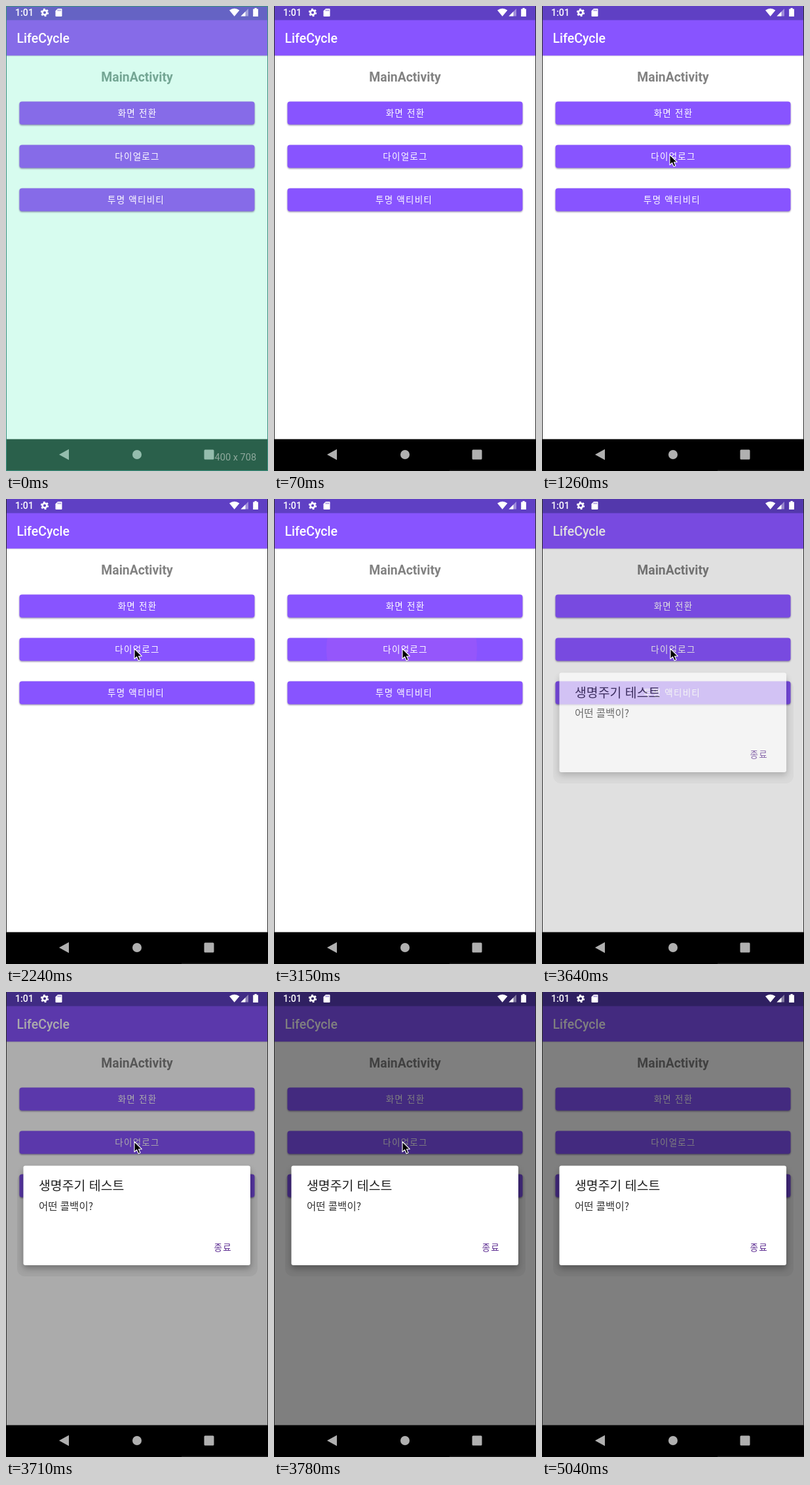
Animation of 400 by 708 pixels, one loop 5.6 s. Source, as an HTML page:

```html
<!DOCTYPE html>
<html lang="ko">
<head>
<meta charset="utf-8">
<title>LifeCycle</title>
<style>
  html, body { margin: 0; width: 100%; height: 100%; overflow: hidden; background: #000; }
  svg {
    display: block; width: 100%; height: 100%;
    --page: #fff; --bar: #8854ff; --status: #5f40c4; --nav: #000;
    --icon: #b0b0b0; --head: #828282; --edge: #2b2b2b;
    font-family: Roboto, "Noto Sans CJK KR", "Noto Sans CJK", sans-serif;
  }
  svg.select {
    --page: #d7fcef; --bar: #866be8; --status: #6563c4; --nav: #2a604b;
    --icon: #94bdad; --head: #74a694; --edge: #3a8f7f;
  }
  .select-only { display: none; }
  .select .select-only { display: inline; }
  .select .record-only { display: none; }
  .kr { font-family: "Noto Sans CJK KR", "Noto Sans CJK", sans-serif; }
  .btn { font-size: 13.55px; letter-spacing: 1.21px; }
</style>
</head>
<body>
<svg id="stage" viewBox="0 0 400 708" preserveAspectRatio="none">
  <defs>
    <filter id="soft" x="-10%" y="-30%" width="120%" height="160%"><feGaussianBlur stdDeviation="1.1"/></filter>
    <filter id="wide" x="-10%" y="-20%" width="120%" height="140%"><feGaussianBlur stdDeviation="5"/></filter>
    <clipPath id="pressed"><rect x="20.5" y="211.5" width="359" height="35" rx="4"/></clipPath>
  </defs>

  <rect width="400" height="708" fill="var(--page)"/>
  <rect y="75" width="400" height="1.5" fill="#000" opacity=".12"/>
  <rect y="21" width="400" height="54.5" fill="var(--bar)"/>
  <rect width="400" height="21.5" fill="var(--status)"/>
  <text x="16.5" y="56" font-size="19.5" font-weight="500" fill="#fff">LifeCycle</text>
  <text x="200" y="115" font-size="19.4" font-weight="700" text-anchor="middle" fill="var(--head)">MainActivity</text>
  <g id="buttons"></g>
  <g clip-path="url(#pressed)"><circle id="ripple" cx="195" cy="229" fill="#ff66d8" opacity="0"/></g>
  <g id="labels" class="kr btn" fill="#fff" text-anchor="middle"></g>
  <rect id="dim" width="400" height="660" opacity="0"/>

  <g id="dialog" opacity="0">
    <rect x="17" y="276" width="367" height="157" rx="12" opacity=".05"/>
    <rect x="26" y="270" width="348" height="151" rx="5" opacity=".28" filter="url(#wide)"/>
    <rect x="26.5" y="264.5" width="346.5" height="151.5" rx="3" fill="#fff"/>
    <g class="kr">
      <text x="50" y="302" font-size="19.4" fill="#1f1f1f">생명주기 테스트</text>
      <text x="50" y="332" font-size="15.5" fill="#303030">어떤 콜백이?</text>
      <text class="btn" x="317.5" y="394" fill="#5b2a90">종료</text>
    </g>
  </g>

  <g fill="#fff">
    <text x="14" y="15" font-size="14.2" font-weight="500">1:01</text>
    <circle cx="59" cy="10" r="3.4" fill="none" stroke="#fff" stroke-width="2.6"/>
    <circle cx="59" cy="10" r="5.2" fill="none" stroke="#fff" stroke-width="2" stroke-dasharray="2.7 2.745"/>
    <path d="M79 4h5.5q1 0 1 1v10q0 1-1 1h-8q-1 0-1-1V7.500z"/>
    <path d="M79.300 5.500v2.200M81.300 5.500v2.200M83.300 5.500v2.200" stroke="var(--status)" stroke-width=".9"/>
    <path d="M341 6.500Q348.700 .8 356.400 6.500L348.700 15.700z"/>
    <path d="M370 4V15.500H358.500z" opacity=".4"/>
    <path d="M365.500 8.500V15.500H358.500z"/>
    <path d="M379.500 3h3.200v1.500h2.300v11.500h-7.800V4.500h2.300z"/>
  </g>

  <rect y="659.500" width="400" height="48.500" fill="var(--nav)"/>
  <g fill="var(--icon)">
    <path d="M81 683L96 674.800V691.200z"/>
    <circle cx="200" cy="683" r="7"/>
    <rect x="302.500" y="675.500" width="15" height="15" rx="1.500"/>
  </g>
  <rect class="record-only" x="268" y="706.500" width="132" height="1.500" fill="#1c1c1c"/>
  <path d="M.5 0V660M399.500 0V660" stroke="var(--edge)"/>
  <g class="select-only">
    <rect x=".5" y=".5" width="399" height="707" fill="none" stroke="#3a8f7f"/>
    <text x="318.500" y="692" font-size="14.600" fill="#8fa99d">400 x 708</text>
  </g>

  <path id="cursor" d="M0 0V15.500L3.600 12.200L6.200 18L9 16.800L6.500 11.200H11.300z" fill="#000" stroke="#fff" stroke-width="1.100" stroke-linejoin="round"/>
</svg>
<script>
const LOOP = 5600, STEP = 70;
const $ = id => document.getElementById(id);
const set = (id, attrs) => { for (const k in attrs) $(id).setAttribute(k, attrs[k]); };
const ramp = (t, a, b) => Math.min(1, Math.max(0, (t - a) / (b - a)));
const smooth = p => p * p * (3 - 2 * p);

// label, top, text centre
const buttons = [['화면 전환', 145.5, 200.5], ['다이얼로그', 211.5, 200.5], ['투명 액티비티', 277.5, 198.5]];
for (const [label, y, cx] of buttons) {
  $('buttons').innerHTML +=
    `<rect x="20.500" y="${y + 1.2}" width="359" height="35" rx="4" fill="#20104a" opacity=".45" filter="url(#soft)"/>` +
    `<rect x="20.500" y="${y}" width="359" height="35" rx="4" fill="var(--bar)"/>`;
  $('labels').innerHTML += `<text x="${cx}" y="${y + 22.5}">${label}</text>`;
}

// time, x, y of the pointer tip
const path = [
  [280, 262, 712], [630, 225, 334], [1260, 195, 226.5], [1680, 196, 228],
  [3780, 196, 228], [3990, 215, 463], [4200, 216, 466], [4970, 285, 712]
];

function pointer(t) {
  if (t <= path[0][0]) return path[0].slice(1);
  const i = path.findIndex(p => p[0] >= t);
  if (i < 0) return path[path.length - 1].slice(1);
  const [t0, x0, y0] = path[i - 1], [t1, x1, y1] = path[i];
  const p = smooth(ramp(t, t0, t1));
  return [x0 + (x1 - x0) * p, y0 + (y1 - y0) * p];
}

function draw(t) {
  $('stage').classList.toggle('select', t < STEP);
  const [x, y] = pointer(t);
  set('cursor', { transform: `translate(${x} ${y})` });
  set('ripple', {
    r: 30 + 170 * ramp(t, 3010, 3290),
    opacity: t < 3010 ? 0 : .11 * (1 - ramp(t, 3430, 3570))
  });
  set('dim', { opacity: .5 * ramp(t, 3600, 3767) });
  set('dialog', { opacity: ramp(t, 3540, 3690) });
}

const start = performance.now();
function tick() {
  const t = (performance.now() - start) % LOOP;
  draw(Math.floor(t / STEP) * STEP);
  requestAnimationFrame(tick);
}
tick();
</script>
</body>
</html>
```
